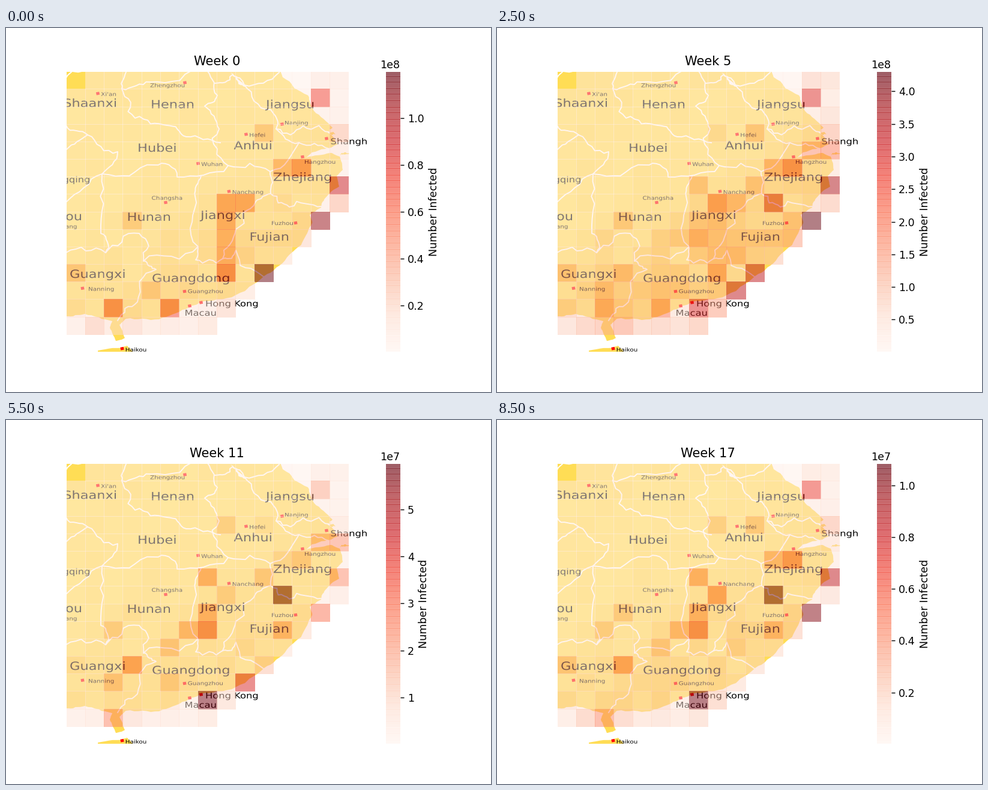
Animation, 808 px wide and 606 px high, one loop 9 s. Source, as a matplotlib script:

```python
import numpy as np
import matplotlib.pyplot as plt
from matplotlib.animation import FuncAnimation
from matplotlib.patches import PathPatch, Polygon
from matplotlib.textpath import TextPath
from matplotlib.transforms import Affine2D

plt.rcParams["font.family"] = "DejaVu Sans"
plt.rcParams["pcolormesh.snap"] = False

WEEKS = 18
N = 16
LAND = "#ffdd55"
MAP_ASPECT = 1.2  # the whole map is wider than its natural shape
BIG, MID, SMALL = 18.75, 13.6, 8.65
rng = np.random.default_rng(7)


def bump(week, centre, spread):
    return np.exp(-((week - centre) / spread) ** 2)


def peak_count(week):
    """Highest count of the week: a quick rise, then a long decay."""
    keys = [0, 1, 3, 5, 7, 11, 15, 17]
    millions = [119.7, 240, 441, 430, 311.5, 59.8, 13.41, 10.84]
    return 1e6 * np.exp(np.interp(week, keys, np.log(millions)))


# How an outbreak runs, and the (row, column, strength) of its cells
OUTBREAKS = [
    # early, then fading
    (lambda w: .15 + .85 * bump(w, 0, 7),
     [(11, 10, 1.05), (11, 8, .64), (13, 2, .62), (13, 5, .64), (10, 8, .46),
      (9, 8, .44), (8, 8, .46), (7, 9, .5), (12, 4, .3), (7, 14, .3)]),
    # in the middle weeks
    (lambda w: bump(w, 8, 5),
     [(12, 9, 1), (4, 14, .55), (4, 13, .5), (6, 10, .4), (12, 2, .45), (12, 5, .4)]),
    # late, and staying
    (lambda w: 1 - bump(w, 0, 5),
     [(13, 7, .97), (7, 11, 1), (9, 7, .6), (8, 7, .42), (6, 7, .42), (9, 6, .38),
      (9, 11, .4), (11, 3, .5), (14, 2, .42), (10, 5, .3), (9, 2, .25), (3, 8, .22)]),
    # constant apart from a dip
    (lambda w: 1 - .55 * bump(w, 10, 3.5),
     [(8, 13, .95), (6, 14, .8), (1, 13, .65), (5, 12, .56), (5, 11, .38), (7, 8, .5),
      (11, 0, .3), (3, 10, .27), (3, 14, .28), (8, 3, .26), (14, 1, .25)]),
]

row, col = np.mgrid[0:N, 0:N]
coastal = np.maximum(np.clip((row + .6 * col - 9) / 6, 0, 1), .6 * (col > 12))
inland_level = .025 + .04 * rng.random((N, N))
coast_level = .17 * coastal * (.4 + 1.1 * rng.random((N, N)))
blank = (col >= np.minimum(15, 22 - row)) | (row == N - 1) | (row + col == 0)


def levels(week):
    """Share of the weekly peak in each cell."""
    swell = .35 + .75 * bump(week, 4, 4) + .4 * bump(week, 16, 4)
    grid = inland_level + coast_level * swell
    for curve, cells in OUTBREAKS:
        for r, c, strength in cells:
            grid[r, c] = max(grid[r, c], strength * curve(week))
    return np.ma.array(grid / grid[~blank].max(), mask=blank)


def wiggle(points, rough=.12, depth=3):
    """Break a line into finer, uneven steps."""
    pts = np.array(points, float)
    for _ in range(depth):
        step = np.diff(pts, axis=0)
        normal = np.column_stack([-step[:, 1], step[:, 0]])
        mid = pts[:-1] + step / 2 + normal * rng.normal(0, rough, (len(step), 1))
        fine = np.empty((2 * len(pts) - 1, 2))
        fine[::2], fine[1::2] = pts, mid
        pts = fine
    return pts


fig, ax = plt.subplots(figsize=(6.4, 4.8), dpi=126.25)
edges = np.arange(N + 1)
mesh = ax.pcolormesh(edges, edges, levels(0) * peak_count(0), cmap="Reds",
                     alpha=.5, linewidth=0)
mesh.set_clim(1e5, peak_count(0))
ax.set_xlim(0, N)
ax.set_ylim(N, 0)
ax.axis("off")
title = ax.set_title("")
bar = fig.colorbar(mesh, ax=ax, label="Number Infected")
bar.outline.set_visible(False)
bar.ax.yaxis.set_offset_position("right")

# Map under the grid, in stage pixels
land = fig.add_axes(ax.get_position(), zorder=-1)
land.set_xlim(101, 601.96)
land.set_ylim(539.34, 72.72)
land.axis("off")


def fill(points, rough=.08, color=LAND):
    land.add_patch(Polygon(wiggle(points, rough), facecolor=color, edgecolor="none"))


def label(text, x, y, size, right=False):
    """Write a map label from its left or right end on the baseline."""
    path = TextPath((0, 0), text, size=size)
    if right:
        x -= path.get_extents().x1 * MAP_ASPECT
    move = Affine2D().scale(MAP_ASPECT, -1).translate(x, y)
    land.add_patch(PathPatch(move.transform_path(path), facecolor="black", lw=0, zorder=4))


def city(text, x, y, dx=5.2, dy=4.2, size=SMALL):
    """A tilted red marker with its name beside it."""
    corners = np.array([(-3.1, -1.9), (2.2, -2.8), (3.1, 1.9), (-2.2, 2.8)])
    land.add_patch(Polygon(corners + (x, y), color="red", lw=0, zorder=5))
    label(text, x + dx, y + dy, size)


# Coast from the north-east to the south-west
fill([(100, 70), (455, 70), (461, 82), (503, 112), (513, 138), (544, 166), (534, 172),
      (552, 194), (510, 207), (500, 216), (540, 208), (556, 214), (561, 236),
      (551, 246), (555, 264), (531, 284), (525, 299), (506, 311), (510, 325),
      (496, 352), (468, 382), (430, 413), (398, 438), (336, 455), (300, 468),
      (255, 485), (200, 484), (189, 494), (198, 516), (183, 521), (173, 498),
      (177, 488), (131, 476), (100, 480), (100, 70)], .05)
fill([(153, 537), (202, 529), (214, 542), (154, 542), (153, 537)], .04)
fill([(557, 212), (572, 209), (557, 212)], .15)
fill([(530, 167), (549, 177), (530, 167)], .15)

BORDERS = [
    [(100, 83), (134, 70)],
    [(201, 70), (193, 101), (240, 90), (336, 70)],
    [(193, 101), (215, 150), (268, 162), (300, 181), (357, 191)],
    [(336, 72), (352, 112), (331, 130), (355, 168), (370, 229)],
    [(100, 162), (136, 178), (101, 202)],
    [(136, 178), (186, 206), (160, 243)],
    [(348, 92), (377, 78), (397, 95), (455, 74)],
    [(397, 95), (441, 136), (450, 168), (488, 191), (538, 201)],
    [(450, 168), (495, 163), (546, 172)],
    [(100, 290), (160, 243), (247, 228), (285, 248), (370, 229), (440, 239), (488, 191)],
    [(160, 243), (158, 342), (166, 374), (222, 342), (229, 388), (320, 364),
     (315, 280), (325, 246)],
    [(100, 374), (166, 374)],
    [(229, 388), (250, 402), (219, 456), (186, 487)],
    [(320, 364), (316, 386), (361, 384), (383, 335), (416, 289), (441, 276), (440, 239)],
    [(441, 276), (472, 298), (526, 297)],
    [(361, 384), (383, 370), (429, 414)],
]
for line in BORDERS:
    land.plot(*wiggle(line).T, color="white", lw=1.1, solid_joinstyle="round")
fill([(374, 74), (399, 98), (387, 93), (374, 74)], color="white")

for name, x, y in [("Henan", 241, 133.5), ("Jiangsu", 433, 133.5), ("Hubei", 219, 206),
                   ("Anhui", 379.5, 202), ("Zhejiang", 445, 254.5), ("Hunan", 201.5, 321),
                   ("Jiangxi", 324, 318), ("Fujian", 405.5, 354), ("Guangxi", 106, 416),
                   ("Guangdong", 243, 423)]:
    label(name, x, y, BIG)
label("Shaanxi", 183, 131.5, BIG, right=True)
label("Guizhou", 125, 320, BIG, right=True)
label("Chongqing", 139, 257, MID, right=True)
label("Guiyang", 117.5, 333.5, SMALL, right=True)

city("Zhengzhou", 298, 91, -58, 7.5)
city("Xi'an", 153, 109)
city("Nanjing", 460, 160, 4, 1)
city("Hefei", 400, 177)
city("Wuhan", 320, 225.5)
city("Hangzhou", 494, 214.5, 3, 11.5)
city("Changsha", 266, 290.5, -23.5, -4.5)
city("Nanchang", 371.5, 272)
city("Fuzhou", 482.5, 324.5, -40.5, 3.5)
city("Nanning", 127.5, 433.3, 9.5)
city("Guangzhou", 297.5, 438.5, dy=2.8)
city("Haikou", 193.5, 533.7, dy=4.8)
city("Hong Kong", 325, 457, 7, 6.5, MID)
city("Macau", 306, 462.7, -8.5, 16.3, MID)
city("Shanghai", 534, 184, 6.5, 9.5, MID)


def draw(week):
    peak = peak_count(week)
    mesh.set_array(levels(week) * peak)
    mesh.set_clim(peak * .0008, peak)
    title.set_text(f"Week {week}")
    return mesh, title


anim = FuncAnimation(fig, draw, frames=WEEKS, interval=500, init_func=lambda: draw(0),
                     repeat=True, repeat_delay=0, blit=False)
plt.show()
```
